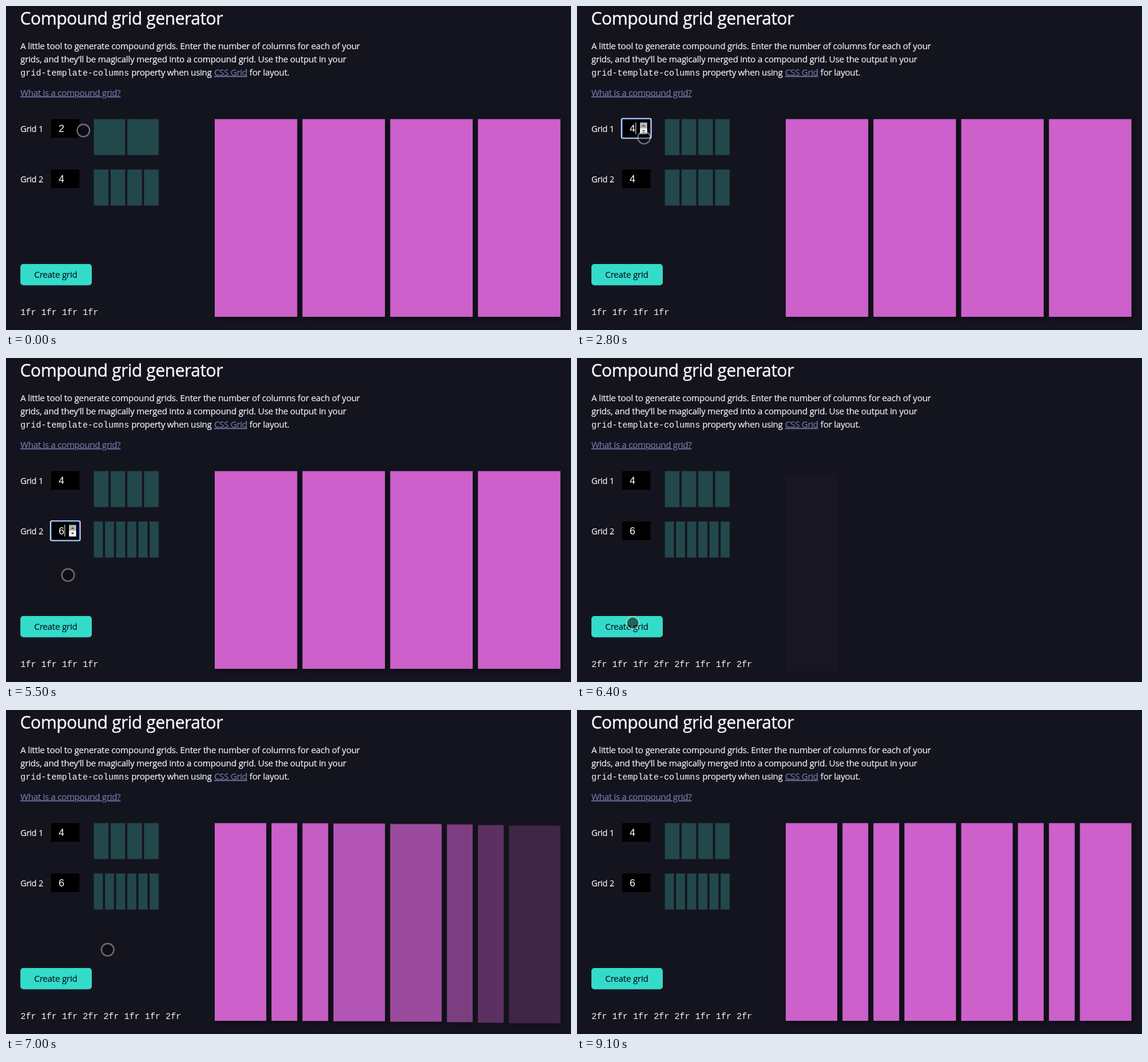
Recreate the animation shown at these times as an HTML page. Size 942x540 px, loop 9200 ms.

```html
<!DOCTYPE html>
<html lang="en">
<head>
<meta charset="utf-8">
<title>Compound grid generator</title>
<style>
  html, body { margin: 0; width: 100%; height: 100%; overflow: hidden; background: #14141f; }
  svg { display: block; width: 942px; height: 540px; }
  text { white-space: pre; }
  .copy { font: 14.5px "Open Sans", "Noto Sans", sans-serif; letter-spacing: -.23px; fill: #f8f8fa; stroke: #f8f8fa; stroke-width: .15px; }
  .title { font-size: 28.6px; letter-spacing: -.42px; stroke-width: .4px; }
  .label { font-size: 14px; letter-spacing: -.3px; }
  .link { fill: #747bac; stroke: #747bac; letter-spacing: -.35px; text-decoration: underline; }
  .dark { fill: #0b1518; stroke: #0b1518; }
  .mono { font: 14.4px "Liberation Mono", "Courier New", monospace; fill: #f8f8fa; }
  .num { font: 17px "Liberation Sans", Arial, sans-serif; fill: #fff; }
  .small { fill: #22484b; }
  .card { fill: #cd60cb; filter: drop-shadow(2px 2px 4px rgba(0, 0, 0, .5)); }
  .enter { animation: enter 9200ms infinite ease-in-out; }
  [data-show] { animation: 9200ms step-end infinite; }
  #cursor { animation: move 9200ms infinite ease-in-out; }
  #cursor circle { fill: rgba(0, 0, 0, .32); stroke: rgba(255, 255, 255, .46); stroke-width: 2; }
  #cursor .press { fill: rgba(0, 0, 0, .3); stroke: none; }

  @keyframes enter {
    0% { opacity: 0; transform: translateY(5.3px); }
    6.96%, 50% { opacity: 1; transform: none; }
    50.01%, 100% { opacity: 0; transform: translateY(5.3px); }
  }
  @keyframes move {
    0%, 3.26% { transform: translate(129px, 207.5px); }
    9.78%, 28.26% { transform: translate(111px, 200.5px); }
    34.78%, 55.43% { transform: translate(114px, 281px); }
    64.13%, 70.11% { transform: translate(93px, 441.5px); }
    73.37%, 100% { transform: translate(169.5px, 399.5px); opacity: 1; }
    86.96% { transform: translate(169.5px, 399.5px); opacity: 1; }
    90.22%, 100% { transform: translate(169.5px, 399.5px); opacity: 0; }
  }
</style>
</head>
<body>
<svg viewBox="0 0 942 540">
  <g class="copy">
    <text class="copy title" x="23.5" y="30.5">Compound grid generator</text>
    <text x="24" y="72.3">A little tool to generate compound grids. Enter the number of columns for each of your</text>
    <text x="24" y="94">grids, and they’ll be magically merged into a compound grid. Use the output in your</text>
    <text class="mono" x="24" y="115.5" letter-spacing="0" stroke="none" style="letter-spacing:0">grid-template-columns</text>
    <text x="209" y="115.7" style="letter-spacing:-.31px">property when using</text>
    <text class="copy link" x="347" y="115.7">CSS Grid</text>
    <text x="406" y="115.7">for layout.</text>
    <text class="copy link" x="24" y="149.7">What is a compound grid?</text>
    <text class="copy label" x="24" y="210">Grid 1</text>
    <text class="copy label" x="24" y="294">Grid 2</text>
  </g>

  <rect x="24" y="430" width="119" height="35.5" rx="5" fill="#34dbca"/>
  <text class="copy dark" x="47" y="453.3">Create grid</text>

  <g id="fields"></g>
  <g id="result"></g>

  <g id="cursor">
    <circle r="10.3"/>
    <circle class="press" r="9.3" data-show="6200 6500"/>
  </g>
</svg>
<script>
const LOOP = 9200, CLICK = 6300;
const FIELD_X = 75, GRID_X = 146.5, GRID_W = 108;
const span = (from, to) => `data-show="${from} ${to}"`;

// Columns sized in fr units, with a fixed gap between them
function columns(frs, x, y, w, h, gap, attrs) {
  const unit = (w - gap * (frs.length - 1)) / frs.reduce((a, b) => a + b);
  return frs.map((fr, i) => {
    const rect = `<rect x="${x.toFixed(2)}" y="${y}" width="${(fr * unit).toFixed(2)}" height="${h}" ${attrs(i)}/>`;
    x += fr * unit + gap;
    return rect;
  }).join('');
}

function field(y, values, hover, focus, blur) {
  const states = values.map(([n, from, to]) => `<g ${span(from, to)}>
    <text class="num" x="87.7" y="${y + 21.5}">${n}</text>
    ${columns(Array(n).fill(1), GRID_X, y, GRID_W, 60, 3.6, () => 'class="small"')}</g>`).join('');
  return `<rect x="${FIELD_X}" y="${y}" width="47.5" height="31" fill="#000"/>
    <g ${span(focus, blur)} fill="none">
      <rect x="74.2" y="${y - 1}" width="49.4" height="33" rx="2.5" stroke="#f4f8ff" stroke-width="1.6"/>
      <rect x="75.6" y="${y + .4}" width="46.6" height="30.2" rx="1.5" stroke="#1f5fc4" stroke-width="1.4"/>
      <path d="M98 ${y + 5.5}v19.5" stroke="#fff"/>
    </g>
    <g ${span(hover, blur)}>
      <rect x="105" y="${y + 6}" width="12" height="19" fill="#f2f2f2"/>
      <rect x="105" y="${y + 6}" width="12" height="9.5" fill="#b4b4b4"/>
      <path d="M108.3 ${y + 12.6}l2.7-3 2.7 3zM108.3 ${y + 18.6}l2.7 3 2.7-3z" fill="#444"/>
    </g>${states}`;
}

function result(frs, from, to, attrs) {
  const label = frs.map(n => n + 'fr').join(' ');
  return `<g ${span(from, to)}>
    <text class="mono" x="24.3" y="514.7">${label}</text>
    ${columns(frs, 348, 188.5, 576.4, 329.5, 8.7, attrs)}</g>`;
}

document.getElementById('fields').innerHTML =
  field(188.5, [[2, 0, 1300], [3, 1300, 2000], [4, 2000, LOOP]], 600, 1300, 3800) +
  field(272.5, [[4, 0, 3800], [5, 3800, 4600], [6, 4600, LOOP]], 3000, 3800, CLICK);

document.getElementById('result').innerHTML =
  result([1, 1, 1, 1], 0, CLICK, () => 'class="card"') +
  result([2, 1, 1, 2, 2, 1, 1, 2], CLICK, LOOP,
    i => `class="card enter" style="animation-delay:${6325 + i * 66 - LOOP}ms"`);

// One stepped visibility animation per data-show window
const sheet = document.createElement('style');
document.querySelectorAll('[data-show]').forEach((el, i) => {
  const [from, to] = el.dataset.show.split(' ').map(ms => (ms / LOOP * 100).toFixed(3) + '%');
  sheet.textContent += `@keyframes show${i}{0%{visibility:hidden}${from}{visibility:visible}${to}{visibility:hidden}}\n`;
  el.style.animationName = 'show' + i;
});
document.head.append(sheet);
</script>
</body>
</html>
```
